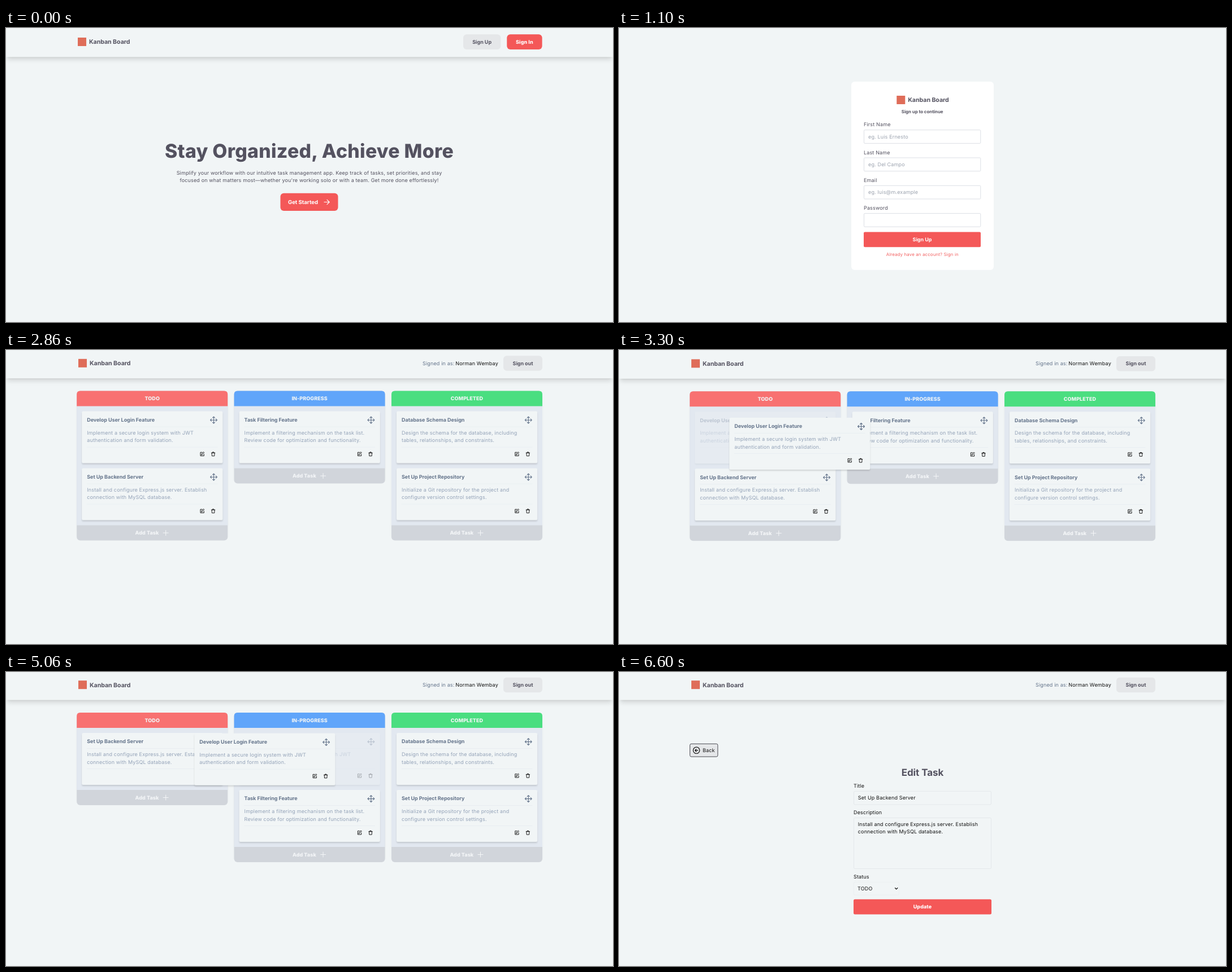
These frames come from a looping animation (1074 px wide and 521 px high, 7700 ms). An HTML page:

```html
<!DOCTYPE html>
<html lang="en">
<head>
<meta charset="utf-8">
<title>Kanban Board</title>
<style>
html, body { margin: 0; width: 100%; height: 100%; overflow: hidden; background: #f1f5f6; }
svg { display: block; width: 1074px; height: 521px; }
text { font-family: Inter, "Open Sans", sans-serif; font-size: 9px; letter-spacing: .017em; white-space: pre; text-rendering: geometricPrecision; }
.semi { font-weight: 700; letter-spacing: -.004em; }
.bold { font-weight: 800; letter-spacing: .008em; }
.mid { text-anchor: middle; }
.line { fill: none; stroke-linecap: round; stroke-linejoin: round; }
.scene { visibility: hidden; animation: show 7.7s step-end infinite; }
@keyframes show {
  0% { visibility: visible; }
  14.28571%, 100% { visibility: hidden; }
}
</style>
</head>
<body>
<svg id="stage" viewBox="0 0 1074 521"></svg>
<script>
const BG = '#f1f5f6', INK = '#545260', RED = '#f45858', GRAY = '#e5e7e9', SLATE = '#64748b', PALE = '#94a3b8';
const USER = 'Norman Wembay';

const rect = (x, y, w, h, fill, r = 0, extra = '') =>
  `<rect x="${x}" y="${y}" width="${w}" height="${h}" rx="${r}" fill="${fill}" ${extra}/>`;
const text = (x, y, s, fill, cls = '', size = 9) =>
  `<text x="${x}" y="${y}" fill="${fill}" class="${cls}" style="font-size:${size}px">${s}</text>`;
const line = (d, color, width) =>
  `<path class="line" d="${d}" stroke="${color}" stroke-width="${width}"/>`;
const move = (x, y, body, opacity = 1) => `<g transform="translate(${x} ${y})" opacity="${opacity}">${body}</g>`;
const shadow = (x, y, w, h, blur, alpha) =>
  rect(x, y, w, h, '#000', 0, `opacity="${alpha}" style="filter:blur(${blur}px)"`);
const button = (x, y, w, h, label, fill, color, cls = 'bold', r = 6) =>
  rect(x, y, w, h, fill, r) + text(x + w / 2, y + h / 2 + 3.2, label, color, cls + ' mid');

const brand = (x, y) => rect(x, y - 7.5, 15, 15, '#df6d59') +
  text(x + 20, y + 3.8, 'Kanban Board', INK, 'semi', 10.6);

const bar = (x, y, right) =>
  shadow(2, 8, 1070, y - 3.5, 4.2, .12) + shadow(3, 8, 1068, y - 7.5, 1.7, .09) +
  rect(0, 0, 1074, y, BG) + brand(x, y - 27) + right;

const userBar = y => bar(128, y,
  text(737, y - 23.7, 'Signed in as:', SLATE) + text(795.3, y - 23.7, USER, '#111') +
  button(880, y - 40, 69, 26.5, 'Sign out', GRAY, INK, 'semi'));

// Board
const tasks = {
  login: ['Develop User Login Feature', 'Implement a secure login system with JWT', 'authentication and form validation.'],
  server: ['Set Up Backend Server', 'Install and configure Express.js server. Establish', 'connection with MySQL database.'],
  filter: ['Task Filtering Feature', 'Implement a filtering mechanism on the task list.', 'Review code for optimization and functionality.'],
  schema: ['Database Schema Design', 'Design the schema for the database, including', 'tables, relationships, and constraints.'],
  repo: ['Set Up Project Repository', 'Initialize a Git repository for the project and', 'configure version control settings.']
};
const moveIcon = line('M-6 0H6M0-6V6M-4-2L-6 0L-4 2M4-2L6 0L4 2M-2-4L0-6L2-4M-2 4L0 6L2 4', SLATE, 1.1);
const editIcon = line('M0-3H-3V3.3H3.3V.4M-1.2 1.3L-.9-.4L2.6-3.7L3.8-2.5L.4 .9Z', '#111', .95);
const trashIcon = line('M-3.2-2H3.2M-1.1-2V-3.4H1.1V-2M-2.5-2L-2.2 3.5H2.2L2.5-2', '#111', .95);

const card = ([title, a, b], x, y, opacity = 1) => move(x, y,
  shadow(.5, 2.7, 248.2, 91, 1.7, .16) + rect(0, 0, 249.2, 92, BG, 2.5) +
  text(9, 18.4, title, SLATE, 'semi') + move(233.3, 15.6, moveIcon) +
  line('M9 27.5H240M9 63.5H240', '#e2e8ee', .6) +
  text(9, 41.3, a, PALE) + text(9, 54.8, b, PALE) +
  move(212.8, 75.7, editIcon) + move(232.4, 75.7, trashIcon), opacity);

const column = (x, title, color, list, ghost) => {
  const foot = 36 + list.length * 101;
  return move(x, 0,
    shadow(1, 8, 265, foot + 14, 2.5, .05) +
    rect(0, 0, 267, foot + 27, '#d1d5db', 6) + rect(0, 18, 267, foot - 18, '#e2e8f0') +
    `<path d="M0 27V6Q0 0 6 0H261Q267 0 267 6V27Z" fill="${color}"/>` +
    text(133.5, 16.6, title, BG, 'bold mid') +
    list.map((k, i) => card(tasks[k], 9, 36 + i * 101, k === ghost ? .3 : 1)).join('') +
    text(103.4, foot + 16.7, 'Add Task', '#f4f6f8', 'bold') +
    line(`M153 ${foot + 13.5}h9m-4.5-4.5v9`, '#f4f6f8', 1));
};

const board = (dy, todo, doing, ghost, drag = '') => userBar(50.3 + dy) + move(0, 72.6 + dy,
  column(125.2, 'TODO', '#f87171', todo, ghost) +
  column(403.6, 'IN-PROGRESS', '#60a5fa', doing, ghost) +
  column(682, 'COMPLETED', '#4ade80', ['schema', 'repo'])) + drag;

// Forms
const field = (x, y, w, h, border) => rect(x, y, w, h, 'none', 2, `stroke="${border}"`);

const signUp = () => {
  const rows = [['First Name', 'eg. Luis Ernesto'], ['Last Name', 'eg. Del Campo'], ['Email', 'eg. luis@m.example'], ['Password', '']];
  return rect(411, 95, 252, 333.7, '#fff', 6) + brand(491.3, 127.5) +
    text(536.7, 150.6, 'Sign up to continue', INK, 'semi mid', 7.9) +
    rows.map(([label, hint], i) => move(433.5, 180.7 + i * 49.3,
      text(-.5, -6.4, label, INK) + rect(0, 0, 206.3, 23.7, '#fff', 1.5, 'stroke="#dcdfe5"') +
      text(7.5, 15, hint, '#9ca3af'))).join('') +
    button(433, 361.6, 207, 26.7, 'Sign Up', RED, '#fff', 'semi', 2) +
    text(536.7, 403.5, 'Already have an account? Sign in', '#f26262', 'mid', 7.9);
};

const taskForm = (heading, action, title, lines, selectW) => userBar(49.7) +
  rect(125.5, 127.3, 49.3, 22.8, GRAY, 2.5, 'stroke="#484850"') +
  '<circle cx="137" cy="138.8" r="5.7" fill="none" stroke="#111" stroke-width="1.2"/>' +
  line('M139.6 138.8H134.6M136.7 136.6L134.5 138.8L136.7 141', '#111', 1.2) +
  text(148, 141.8, 'Back', '#111') +
  text(537, 184, heading, INK, 'semi mid', 17) +
  text(415, 204.8, 'Title', '#111') + field(415.5, 211.3, 243, 23.7, '#e4e8eb') +
  text(422.8, 226, title, '#111') +
  text(415, 251.7, 'Description', '#111') + field(415.5, 258.5, 243, 90, '#e4e8eb') +
  lines.map((s, i) => text(422.8, 272.8 + i * 13.5, s, '#111')).join('') +
  text(415, 365.8, 'Status', '#111') + field(415.5, 372.3, selectW, 23, '#ebeff1') +
  text(422, 386.8, 'TODO', '#111') + line('M488.6 382.8L490.7 384.9L492.8 382.8', '#111', 1.3) +
  button(415, 402.8, 244, 26.7, action, RED, '#fff', 'bold', 2.5);

const landing = () => bar(127, 51.5,
  button(809, 11.3, 66.3, 26.7, 'Sign Up', GRAY, INK, 'semi') +
  button(886.3, 11.3, 62.3, 26.7, 'Sign In', RED, '#fff')) +
  text(536.5, 229.6, 'Stay Organized, Achieve More', INK, 'bold mid', 33.8) +
  text(536.5, 260, 'Simplify your workflow with our intuitive task management app. Keep track of tasks, set priorities, and stay', INK, 'mid') +
  text(536.5, 273.4, 'focused on what matters most—whether you\'re working solo or with a team. Get more done effortlessly!', INK, 'mid') +
  rect(485.5, 292.7, 102, 31.3, RED, 6) +
  text(499, 311.6, 'Get Started', '#fff', 'semi', 9.6) +
  line('M563 308.5H572M568 304.3L572.2 308.5L568 312.7', '#fff', 1.1);

const scenes = [
  landing(),
  signUp(),
  board(0, ['login', 'server'], ['filter']),
  board(.6, ['login', 'server'], ['filter'], 'login', card(tasks.login, 195.2, 119.9)),
  board(-.6, ['server'], ['login', 'filter'], 'login', card(tasks.login, 333.3, 108.7)),
  taskForm('Add New Task', 'Add', '', [], 79),
  taskForm('Edit Task', 'Update', tasks.server[0], tasks.server.slice(1), 80)
];
document.getElementById('stage').innerHTML = scenes.map((body, i) =>
  `<g class="scene" style="animation-delay:${(i ? i - 7 : 0) * 1.1}s">${body}</g>`).join('');
</script>
</body>
</html>
```
